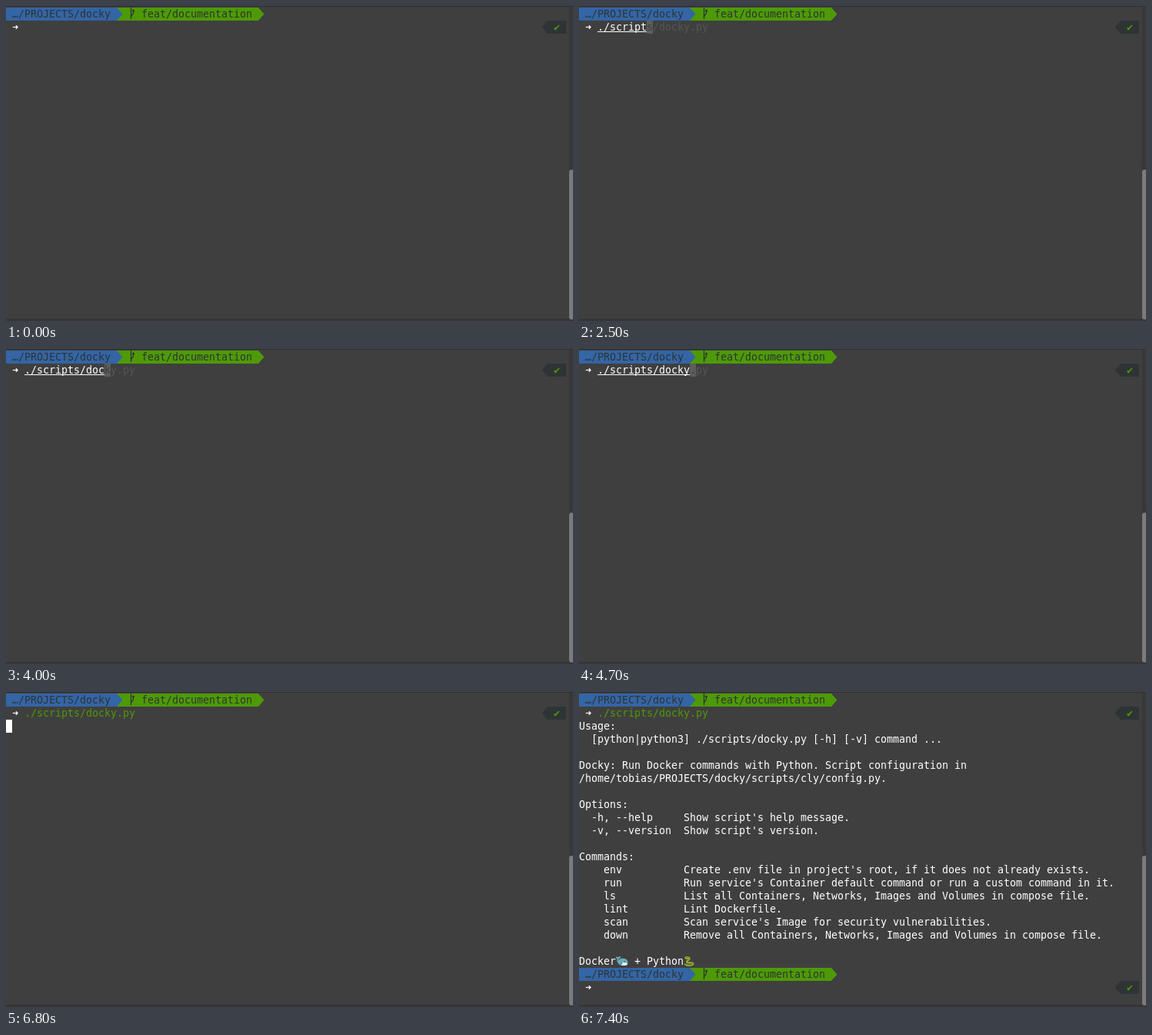
An HTML page with a canvas that plays this animation: 737 px wide and 410 px high, repeating every 8 s.

```html
<!DOCTYPE html>
<html lang="en">
<head>
<meta charset="utf-8">
<title>Terminal</title>
<style>
  html, body { margin: 0; width: 100%; height: 100%; overflow: hidden; background: #3f3f3f; }
  canvas { display: block; }
</style>
</head>
<body>
<canvas id="stage" width="737" height="410"></canvas>
<script>
const ctx = document.getElementById('stage').getContext('2d');
const LOOP = 8000, CELL = 8, LINE = 17, TOP = 2;
const BG = '#3f3f3f', DARK = '#2e3436', BLUE = '#3465a4', GREEN = '#4e9a06';
const WHITE = '#ffffff', DIM = '#555753';

const COMMAND = './scripts/docky.py';
const KEYS = [300, 900, 1200, 1500, 1700, 2100, 2300, 2500, 2700,
              3200, 3500, 3700, 4000, 4400, 4700, 5300, 5600, 6100];
const ENTER = 6700, RUN = 6800, OUTPUT = 7000, PROMPT = 7100, BLINK = 7400;

const HELP = `Usage:
  [python|python3] ./scripts/docky.py [-h] [-v] command ...

Docky: Run Docker commands with Python. Script configuration in
/home/tobias/PROJECTS/docky/scripts/cly/config.py.

Options:
  -h, --help     Show script's help message.
  -v, --version  Show script's version.

Commands:
    env          Create .env file in project's root, if it does not already exists.
    run          Run service's Container default command or run a custom command in it.
    ls           List all Containers, Networks, Images and Volumes in compose file.
    lint         Lint Dockerfile.
    scan         Scan service's Image for security vulnerabilities.
    down         Remove all Containers, Networks, Images and Volumes in compose file.

Docker   + Python`.split('\n');

const rowY = row => TOP + row * LINE;

function rect(x, y, w, h, color) {
  ctx.fillStyle = color;
  ctx.fillRect(x, y, w, h);
}

function poly(color, ...pts) {
  ctx.fillStyle = color;
  ctx.beginPath();
  for (const [x, y] of pts) ctx.lineTo(x, y);
  ctx.fill();
}

function ellipse(x, y, rx, ry, color, turn = 0) {
  ctx.fillStyle = color;
  ctx.beginPath();
  ctx.ellipse(x, y, rx, ry, turn, 0, Math.PI * 2);
  ctx.fill();
}

function stroke(path, width, color) {
  ctx.strokeStyle = color;
  ctx.lineWidth = width;
  ctx.stroke(new Path2D(path));
}

// Each character sits in its own terminal cell.
function print(text, col, row, color) {
  ctx.fillStyle = color;
  [...text].forEach((ch, i) => {
    if (ch !== ' ') ctx.fillText(ch, (col + i) * CELL, rowY(row) + 13);
  });
}

function cursor(col, row, color = WHITE) {
  rect(col * CELL, rowY(row), CELL, LINE, color);
}

function arrowTip(x, y, dir, color) {
  poly(color, [x, y], [x + 7.5 * dir, y + LINE / 2], [x, y + LINE]);
}

function prompt(row) {
  const y = rowY(row);
  rect(0, y, 144, LINE, BLUE);
  rect(144, y, 184, LINE, GREEN);
  arrowTip(144, y, 1, BLUE);
  arrowTip(328, y, 1, GREEN);
  print('…/PROJECTS/docky', 1, row, DARK);
  ctx.save();
  ctx.translate(160, y);
  stroke('M2.5 0V15M2.5 12.5C2.5 9.5 5.5 10 5.5 6.5V3', 1.3, DARK);
  poly(DARK, [3.5, 5], [5.5, 2], [7.5, 5]);
  ctx.restore();
  print('feat/documentation', 22, row, DARK);

  print('➜', 1, row + 1, WHITE);
  rect(704, y + LINE, 24, LINE, DARK);
  arrowTip(704, y + LINE, -1, DARK);
  print('✔', 89, row + 1, GREEN);
}

function commandLine(t) {
  const count = KEYS.filter(k => k <= t).length;
  if (!count) return;
  const typed = COMMAND.slice(0, count), done = count === COMMAND.length;
  const isDir = ['./', './scripts', './scripts/'].includes(typed);
  const color = count === 1 || isDir || done ? GREEN : WHITE;
  print(typed, 3, 1, color);
  if (count > 1 && !done) rect(24, rowY(1) + 14, count * CELL, 1, color);
  print(COMMAND.slice(count), 3 + count, 1, DIM);
  if (t < ENTER) {
    cursor(3 + count, 1, done ? WHITE : '#5c5e5b');
    if (!done) print(COMMAND[count], 3 + count, 1, BG);
  }
}

function whale(x, y) {
  ctx.save();
  ctx.translate(x, y);
  stroke('M3 10C2 8 2 6 3 4', 1.8, '#67aebf');
  ellipse(1.8, 4, 2, 1.2, '#67aebf', 0.5);
  ellipse(4.4, 3.6, 2, 1.2, '#67aebf', -0.5);
  ellipse(9, 9.4, 6.5, 4.6, '#67aebf');
  ellipse(10.5, 12, 4.6, 2, '#e4eef0');
  ellipse(6.8, 11.8, 1.1, 2.2, '#4a8da5', 0.5);
  ellipse(11.5, 9, 0.7, 0.8, '#26343a');
  ctx.restore();
}

function snake(x, y) {
  ctx.save();
  ctx.translate(x, y);
  ctx.lineCap = 'round';
  stroke('M4 4C8 3 9 5 6 7C3 9 4 11 8 10.5C13 9.5 14 13 10 13.5C7 14.3 4 14 2 12.5', 2.3, '#87a52d');
  stroke('M5.5 8C3.5 10 6 11 9 10.3', 0.7, '#d8c53c');
  ellipse(4, 4, 2.5, 1.7, '#9db63b', 0.2);
  ellipse(4, 3.5, 0.6, 0.6, '#292b20');
  stroke('M1.7 5L0.8 6', 0.7, '#c94732');
  ctx.restore();
}

function output() {
  HELP.forEach((line, i) => print(line, 0, i + 2, WHITE));
  whale(48, rowY(20));
  snake(136, rowY(20));
}

function frame() {
  rect(0, 0, 737, 410, BG);
  rect(0, 0, 737, 1, '#303030');
  rect(0, 407, 737, 3, '#373535');
  rect(732, 1, 5, 406, '#383838');
  ctx.fillStyle = '#7b7b7b';
  ctx.beginPath();
  ctx.roundRect(732, 213, 6, 195, 3);
  ctx.fill();
}

function draw(t) {
  frame();
  prompt(0);
  commandLine(t);
  if (t >= OUTPUT) output();
  if (t >= PROMPT) {
    prompt(21);
    if (t < BLINK) cursor(3, 22);
  } else if (t >= OUTPUT) {
    cursor(0, 21);
  } else if (t >= RUN) {
    cursor(0, 2);
  }
}

ctx.font = '13.333px "DejaVu Sans Mono", monospace';
const start = performance.now();
function tick() {
  draw((performance.now() - start) % LOOP);
  requestAnimationFrame(tick);
}
tick();
</script>
</body>
</html>
```
